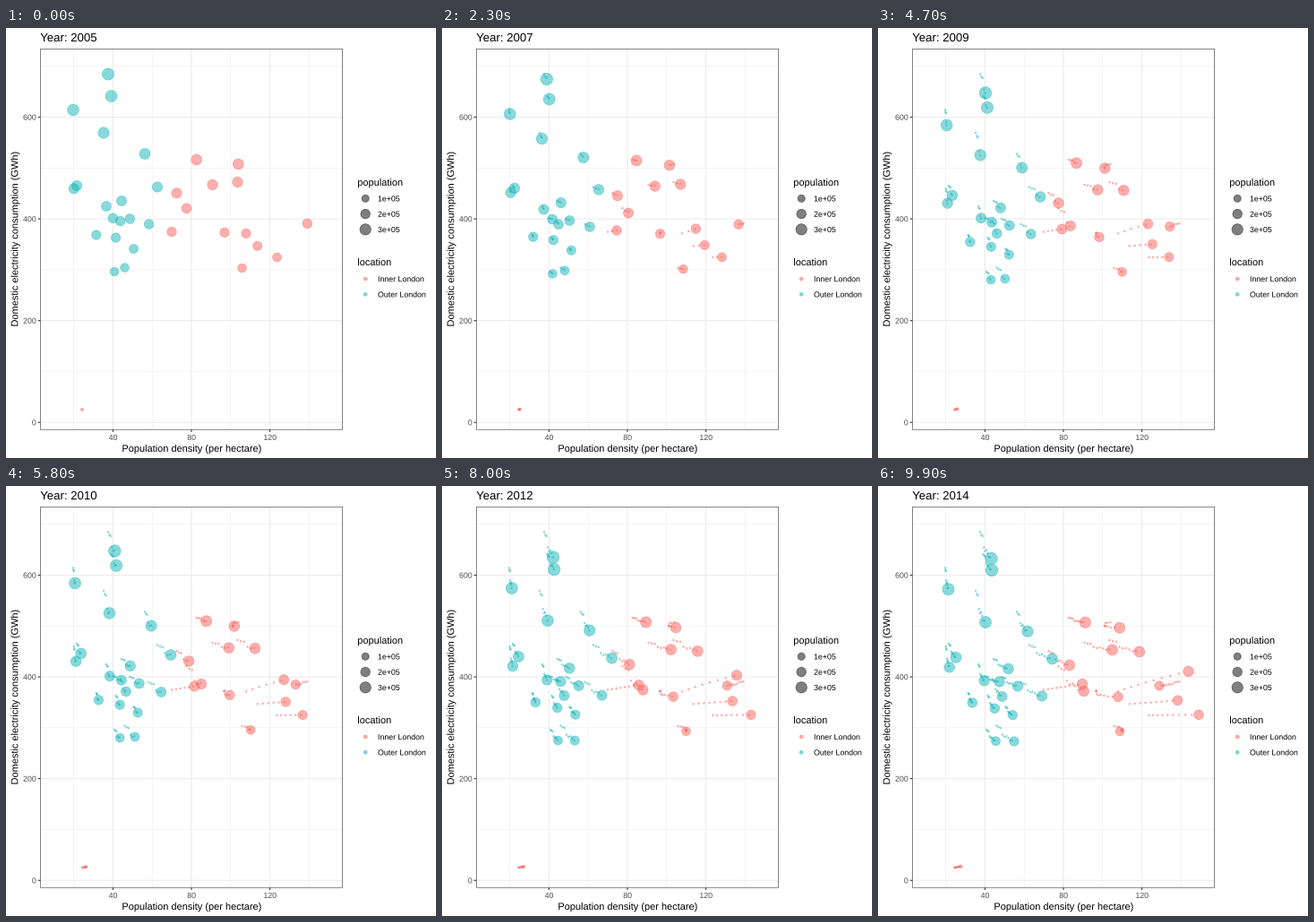
These frames come from a looping animation (480 by 480 pixels, 10000 ms). A matplotlib script:

```python
import numpy as np
import matplotlib.pyplot as plt
from matplotlib.animation import FuncAnimation
from matplotlib.patches import PathPatch, Rectangle
from matplotlib.textpath import TextPath
from matplotlib.transforms import Affine2D

plt.rcParams["font.family"] = "Liberation Sans"

SIZE, FRAMES, STEP = 480, 100, 11          # STEP frames per year
RED, TEAL = (0.98, 0.38, 0.36), (0.08, 0.71, 0.725)
INK, SOFT, GRID = "#333333", "#4d4d4d", "#ebebeb"
ALPHA, PAST_ALPHA, STROKE = 0.5, 0.42, 0.71
LEFT, RIGHT, TOP, BOTTOM = 38.4, 375.6, 23.4, 448.2

# Start and end of each borough on the stage, then an optional sideways bow
OUTER = [
    (114, 51.5, 126.5, 81), (117.5, 76, 127, 94), (75, 91.5, 78.5, 115.3),
    (109, 117, 120, 152), (155, 140.5, 167, 162.3), (169, 177.5, 194.5, 193),
    (79, 176, 87, 191.3), (75.7, 179.3, 79.7, 202.3), (129, 193, 145.5, 204),
    (112, 199, 118.5, 217.5), (119.3, 212.3, 135.5, 218.5),
    (127.5, 215.5, 138.5, 235), (138.3, 213, 156, 223.5),
    (159.5, 219, 183, 234.5), (100.7, 231, 105.3, 242),
    (122.5, 234, 130.3, 248.3), (142.5, 246.5, 150.3, 255.7),
    (132.5, 267.5, 152, 285), (121, 272, 131.5, 284.7),
]
INNER = [
    (212.7, 147, 231.3, 152.3), (259.3, 152, 269.7, 158.3, -11),
    (258.5, 172, 291.7, 185), (230.5, 175, 261.5, 183),
    (190.5, 184.3, 213.7, 200), (201.5, 201.3, 229.7, 229),
    (185, 227.5, 228, 221), (244, 228.3, 268, 235.5, -8.5),
    (268, 229.3, 346.5, 207, -4), (336.3, 218.3, 314, 223),
    (280.7, 243.3, 334.5, 239.3), (302.5, 256, 358, 255.3, -4),
    (263.5, 268, 270, 274, 6), (85, 426, 92.3, 424.7),
]

# Share of the total fall in consumption reached by each year
FALL = [0, 0.1, 0.15, 0.58, 0.72, 0.68, 0.8, 0.95, 0.95, 1]


def px(density):
    return 119.4 + (density - 40) * 2.1896


def py(gwh):
    return 440.25 - gwh * 0.5679


def radius(pop):
    """Dot radius for a population: area scale from size 1 to 6."""
    return dot(1 + 5 * np.sqrt(np.clip((pop - 7000) / 369000, 0, 1)))


def dot(size):
    return 0.375 * (size * 2.845 + 0.945)


def track(x0, y0, x1, y1, bow=0):
    """Steady drift in density; falling use follows the shared curve."""
    t = np.linspace(0, 1, FRAMES)
    fall = np.interp(t * 9, range(10), FALL) if y1 > y0 else t
    x = x0 + (x1 - x0) * t + 4 * bow * t * (1 - t)
    y = y0 + (y1 - y0) * fall
    # Population follows first-year use and grows with density
    pop = 530 * (440.25 - y0) / 0.5679 - 6000
    growth = (x - px(0)) / (x0 - px(0))
    return x, y, radius(pop * growth)


def tint(rgb, alpha=ALPHA):
    return rgb + (alpha,)


fig = plt.figure(figsize=(SIZE / 72, SIZE / 72), dpi=72, facecolor="white")
ax = fig.add_axes([0, 0, 1, 1])
ax.set(xlim=(0, SIZE), ylim=(SIZE, 0))
ax.axis("off")


def line(xs, ys, color, width):
    ax.plot(xs, ys, color=color, lw=width, zorder=1, snap=False, solid_capstyle="butt")


def glyphs(x, y, text, size, align=0, turn=0):
    """Text outline on the baseline at x, y; align 0 left, 0.5 centre, 1 right."""
    path = TextPath((0, 0), text, size=size)
    shift = -align * path.get_extents().x1
    place = Affine2D().translate(shift, 0).rotate_deg(turn).scale(1, -1).translate(x, y)
    return place.transform_path(path)


def label(x, y, text, size=8.8, color="black", **kw):
    patch = PathPatch(glyphs(x, y, text, size, **kw), fc=color, lw=0, snap=False)
    return ax.add_patch(patch)


def dots(x, y, r, colors):
    return ax.scatter(x, y, s=(2 * np.asarray(r)) ** 2, facecolors=colors,
                      edgecolors=colors, linewidths=STROKE, zorder=3)


# Grid, ticks and frame
for v in (20, 60, 100, 140):
    line([px(v)] * 2, [TOP, BOTTOM], GRID, 0.53)
for v in (100, 300, 500, 700):
    line([LEFT, RIGHT], [py(v)] * 2, GRID, 0.53)
for v in (40, 80, 120):
    line([px(v)] * 2, [TOP, BOTTOM], GRID, 1.07)
    line([px(v)] * 2, [BOTTOM, BOTTOM + 2.74], INK, 1.07)
    label(px(v), 460, str(v), color=SOFT, align=0.5)
for v in (0, 200, 400, 600):
    line([LEFT, RIGHT], [py(v)] * 2, GRID, 1.07)
    line([LEFT - 2.74, LEFT], [py(v)] * 2, INK, 1.07)
    label(33.4, py(v) + 3.15, str(v), color=SOFT, align=1)
ax.add_patch(Rectangle((LEFT, TOP), RIGHT - LEFT, BOTTOM - TOP, fill=False,
                       ec=INK, lw=0.6, zorder=5, snap=False))

title = label(38.2, 15, "Year: 2005", 13.2)
label(207, 473, "Population density (per hectare)", 11, align=0.5)
label(13.3, 236, "Domestic electricity consumption (GWh)", 11, align=0.5, turn=90)

# Legends
pop_y = 190.3 + 17.28 * np.arange(3)
loc_y = 280 + 17.28 * np.arange(2)
label(392.3, 176, "population", 11)
label(392.3, 265, "location", 11)
for y, text in zip([*pop_y, *loc_y],
                   ("1e+05", "2e+05", "3e+05", "Inner London", "Outer London")):
    label(415, y + 3.15, text)
dots([401.2] * 5, [*pop_y, *loc_y], [*radius(np.array([1e5, 2e5, 3e5])), dot(1.5), dot(1.5)],
     [tint((0, 0, 0))] * 3 + [tint(RED), tint(TEAL)])

X, Y, R = np.array([track(*b) for b in OUTER + INNER]).transpose(1, 0, 2)
groups = [TEAL] * len(OUTER) + [RED] * len(INNER)
now = [tint(c) for c in groups]
before = [tint(c, PAST_ALPHA) for c in groups]
points = dots(X[:, 0], Y[:, 0], R[:, 0], now)


def update(i):
    # Past years stay behind as small marks
    past = list(range(0, i, STEP))
    shots = past + [i]
    r = np.append(np.full(len(past) * len(X), dot(0.5)), R[:, i])
    rgba = before * len(past) + now
    points.set_offsets(np.column_stack([X[:, shots].T.ravel(), Y[:, shots].T.ravel()]))
    points.set_sizes((2 * r) ** 2)
    points.set_facecolor(rgba)
    points.set_edgecolor(rgba)
    title.set_path(glyphs(38.2, 15, f"Year: {2005 + round(i / STEP)}", 13.2))
    return points, title


anim = FuncAnimation(fig, update, frames=FRAMES, interval=100, repeat=True,
                     repeat_delay=0, blit=False)
plt.show()
```
